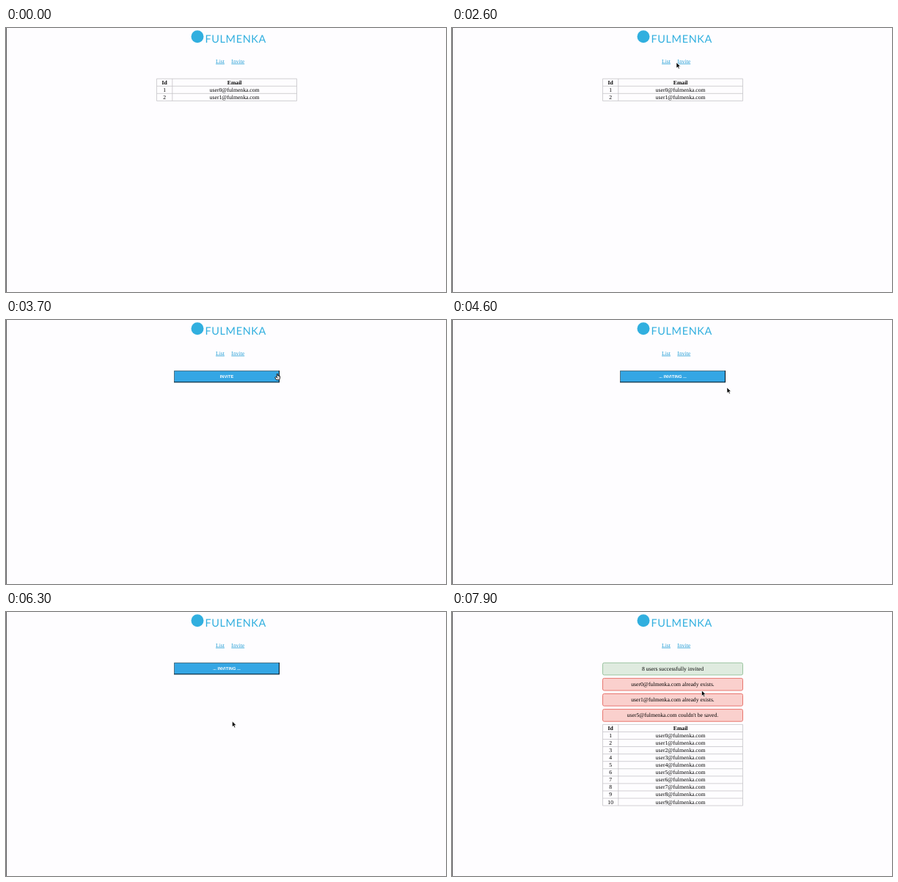
Write an HTML page that moves like this. It is 600x360 px and loops after 8000 ms.

```html
<!DOCTYPE html>
<html lang="en">
<head>
<meta charset="utf-8">
<title>Invite users</title>
<style>
  html, body { margin: 0; width: 100%; height: 100%; overflow: hidden; background: #fefdff; }
  svg { display: block; width: 600px; height: 360px; }
  text { font: 7.68px "Liberation Serif", "Times New Roman", serif; text-anchor: middle; text-rendering: geometricPrecision; }
  .bold { font-weight: bold; }
  .link { fill: #269fd6; text-decoration: underline; }
  .brand { font: 14.5px Lato, sans-serif; letter-spacing: .6px; fill: #31afdf; text-anchor: start; }
  .label { font: bold 5.76px "Liberation Sans", Arial, sans-serif; fill: #fff; }
  .grid { fill: none; stroke: #c6c5c8; stroke-width: .8; }
  .ok { fill: #dfebdf; stroke: #9bc4a0; }
  .error { fill: #fad0cd; stroke: #e8766f; }
</style>
</head>
<body>
<svg id="stage" viewBox="0 0 600 360"></svg>
<script>
const LOOP = 8000, STEP = 100;
const DOMAIN = "fulmenka.com";
const stage = document.getElementById("stage");

const text = (x, y, value, cls = "") => `<text x="${x}" y="${y}" class="${cls}">${value}</text>`;
const group = (id, content) => `<g id="${id}">${content}</g>`;
const mail = n => `user${n}@${DOMAIN}`;

function table(top, divider, count) {
  const pitch = 10.06, left = 205.5, right = 396.5;
  const bottom = top + pitch * (count + 1);
  const idX = (left + divider) / 2, mailX = (divider + right) / 2;
  let lines = `M${left} ${top}V${bottom}M${divider} ${top}V${bottom}M${right} ${top}V${bottom}`;
  let cells = "";
  for (let row = 0; row <= count + 1; row++) {
    const y = top + row * pitch;
    lines += `M${left} ${y}H${right}`;
    if (row > count) continue;
    const cls = row ? "" : "bold";
    cells += text(idX, y + 7.5, row || "Id", cls) + text(mailX, y + 7.5, row ? mail(row - 1) : "Email", cls);
  }
  return `<path class="grid" d="${lines}"/>${cells}`;
}

function alertBox(index, message) {
  const y = 69.3 + index * 21.1;
  return `<rect x="205.5" y="${y}" width="191" height="16.6" rx="2" class="${index ? "error" : "ok"}"/>` +
    text(301, y + 10.6, message);
}

function button(label, light = "#4d7185", dark = "#0e1c27") {
  return `<rect x="229" y="69" width="144" height="16.2" fill="#34a6e4"/>
    <path d="M229.5 85V69.4H373" fill="none" stroke="${light}"/>
    <path d="M229 84.7H372.5V69" fill="none" stroke="${dark}" stroke-width="1.1"/>` +
    text(301, 79.1, label, "label");
}

const alerts = [
  "8 users successfully invited",
  `${mail(0)} already exists.`,
  `${mail(1)} already exists.`,
  `${mail(5)} couldn't be saved.`
];

stage.innerHTML =
  `<rect width="600" height="360" fill="#fefdff"/>
  <rect width="1" height="360" fill="#5a595c"/>
  <circle cx="261" cy="11.7" r="8.5" fill="#31afdf"/>` +
  text(271.5, 19.8, "FULMENKA", "brand") +
  text(292, 47.6, "List", "link") + text(316.3, 47.6, "Invite", "link") +
  group("list", table(69.2, 226.8, 2)) +
  group("invite", button("INVITE")) +
  group("pressed", button("INVITE", "#0e1c27", "#4d7185")) +
  group("inviting", button("... INVITING ...")) +
  group("result", alerts.map((message, i) => alertBox(i, message)).join("")) +
  group("empty", table(153.4, 261.5, 0)) +
  group("full", table(153.4, 226.8, 10)) +
  group("arrow", `<path d="M0 0V7.6L1.8 6 3 8.8 4.3 8.2 3.1 5.5H5.5Z" fill="#000" stroke="#fff" stroke-width=".6"/>`) +
  group("hand", `<path d="M-.7 .6Q0-.4.7.6V3L3.6 3.7V6.2L2.8 8.6H-1.4L-3.3 5.3Q-2.7 4-.7 5.6Z" fill="#fff" stroke="#111" stroke-width=".9"/>
    <path d="M.3 5.3V7M1.8 5.3V7" stroke="#111" stroke-width=".5"/>`);

// Visible spans: id, then start and end pairs
const spans = {
  list: [0, 2900],
  invite: [2900, 3900],
  pressed: [3900, 4000],
  inviting: [4000, 6600],
  result: [6600, LOOP],
  empty: [6600, 7400],
  full: [7400, LOOP],
  hand: [2700, 3100, 3600, 4200],
  arrow: [700, 2700, 3100, 3600, 4200, LOOP]
};

// Pointer stops: time, x, y
const stops = [
  [600, 580, 170], [1400, 345, 47], [1700, 345, 47], [2400, 309, 46], [2500, 309, 46],
  [2600, 306, 47], [2700, 312, 44], [3000, 312, 44], [3200, 322, 62], [3400, 322, 62],
  [3700, 370, 73], [4000, 371, 74], [4300, 375, 79], [4400, 375, 79], [4600, 375, 92],
  [5300, 341, 122], [6200, 309, 148], [6300, 308.5, 149], [6900, 340.5, 107], [LOOP, 340.5, 107]
];

function pointerAt(time) {
  const next = Math.max(1, stops.findIndex(stop => stop[0] > time));
  const [t0, x0, y0] = stops[next - 1], [t1, x1, y1] = stops[next];
  const p = Math.max(0, (time - t0) / (t1 - t0));
  const eased = p * p * (3 - 2 * p);
  return [x0 + (x1 - x0) * eased, y0 + (y1 - y0) * eased];
}

const parts = Object.keys(spans).map(id => [document.getElementById(id), spans[id]]);
const pointers = ["arrow", "hand"].map(id => document.getElementById(id));

function draw(now) {
  const time = Math.floor((now % LOOP) / STEP) * STEP;
  for (const [node, span] of parts) {
    const shown = span.filter(edge => edge <= time).length % 2;
    node.style.display = shown ? "" : "none";
  }
  const [x, y] = pointerAt(time);
  for (const pointer of pointers) pointer.setAttribute("transform", `translate(${x} ${y})`);
}

const start = performance.now();
function tick() {
  draw(performance.now() - start);
  requestAnimationFrame(tick);
}
tick();
</script>
</body>
</html>
```
